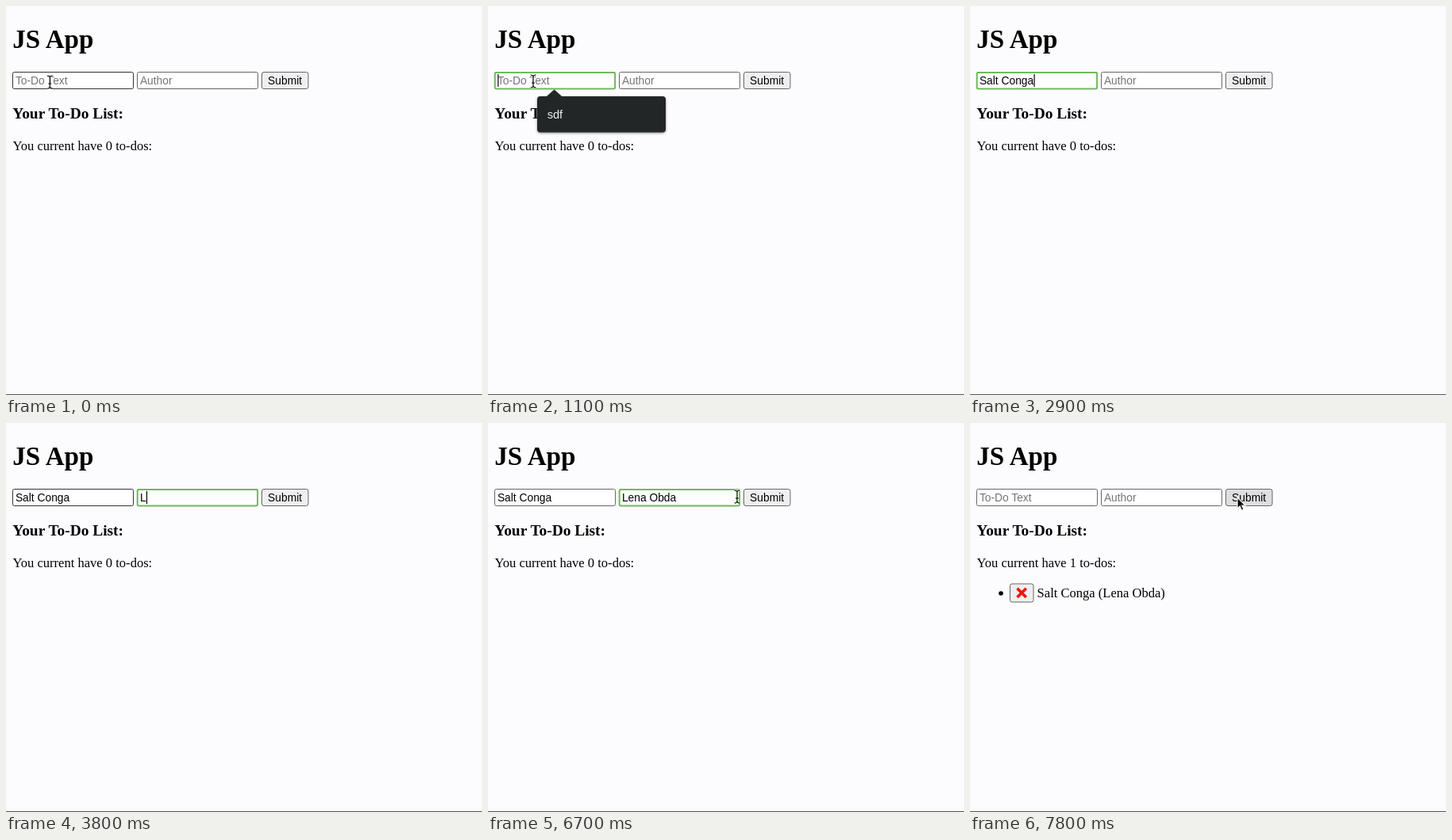
Animation, 600 px wide and 491 px high, one loop 8 s. Source, as an HTML page:

```html
<!DOCTYPE html>
<html lang="en">
<head>
<meta charset="utf-8">
<title>JS App</title>
<style>
  html, body { margin: 0; width: 100%; height: 100%; overflow: hidden; background: #fcfbfe; }
  svg { display: block; }
  text { white-space: pre; fill: #000; }
  .serif { font: 16.56px "Liberation Serif", serif; }
  .h1 { font-size: 33.1px; font-weight: bold; }
  .h3 { font-size: 19.4px; font-weight: bold; }
  .sans { font: 13.8px "Liberation Sans", sans-serif; }
  .box { fill: #fff; stroke: #666; }
  .btn { fill: #efefef; stroke: #666; }
  .ring { fill: none; stroke: #6fba5c; stroke-width: 2; }
  .halo { fill: none; stroke: #fff; stroke-width: 3; opacity: .85; }
  .ink { fill: none; stroke: #000; stroke-width: 1.2; }
</style>
</head>
<body>
<svg width="600" height="491" viewBox="0 0 600 491">
  <defs>
    <filter id="shadow" x="-10%" y="-20%" width="120%" height="150%">
      <feDropShadow dx="0" dy="1" stdDeviation="1.5" flood-opacity=".45"/>
    </filter>
    <path id="beamPath" d="M-3.5-8Q0-8 0-5.5Q0-8 3.5-8M0-6V6M-3.5 8Q0 8 0 5.5Q0 8 3.5 8M-2 2H2"/>
  </defs>
  <rect width="600" height="491" fill="#fcfbfe"/>
  <rect y="490" width="600" height="1" fill="#555"/>

  <text class="serif h1" x="8.3" y="52.7">JS App</text>
  <text class="serif h3" x="8.3" y="142.3">Your To-Do List:</text>
  <text class="serif" id="count" x="8.5" y="182"></text>

  <g id="fields"></g>
  <rect class="btn" id="submit" x="322.5" y="83.5" width="58.5" height="21" rx="2.5"/>
  <text class="sans" x="351.6" y="98.7" text-anchor="middle">Submit</text>
  <rect id="caret" y="86" width="1.2" height="16"/>

  <g id="item">
    <circle cx="39" cy="215" r="2.8"/>
    <rect class="btn" x="50.5" y="203" width="29.5" height="23" rx="2.5"/>
    <path d="M59.5 208.7L70.8 220M70.8 208.7L59.5 220" stroke="#f01408" stroke-width="3.6" fill="none"/>
    <text class="serif" id="label" x="84.6" y="220"></text>
  </g>

  <g id="popup">
    <path filter="url(#shadow)" fill="#222628"
      d="M66 114H74L83.5 105.5L93 114H220a4 4 0 0 1 4 4V155.5a4 4 0 0 1-4 4H66a4 4 0 0 1-4-4V118a4 4 0 0 1 4-4Z"/>
    <text class="sans" x="74.7" y="142" style="font-size:14.6px;fill:#f1f1f1">sdf</text>
  </g>

  <g id="beam"><use href="#beamPath" class="halo"/><use href="#beamPath" class="ink"/></g>
  <path id="arrow" d="M0 0V14L3.2 11L5.4 16.2L7.9 15.1L5.7 10.1H10Z" stroke="#fff" stroke-width="1.2"/>
</svg>
<script>
const LOOP = 8000, STEP = 100;
const FOCUS = [100, 3200], PRESS = 7200, ADDED = 7300;
const $ = id => document.getElementById(id);

function makeField(x, hint, value, keys) {
  const g = document.createElementNS("http://www.w3.org/2000/svg", "g");
  g.innerHTML = `<rect class="box" x="${x + 0.5}" y="83.5" width="152" height="21" rx="2"/>
    <text class="sans" x="${x + 3.9}" y="98.7"></text>
    <rect class="ring" x="${x + 0.7}" y="84" width="151.4" height="20.4" rx="2"/>`;
  $("fields").append(g);
  const [box, text, ring] = g.children;
  return { x, hint, value, keys, box, text, ring };
}

const fields = [
  makeField(8, "To-Do Text", "Salt Conga",
    [1500, 1700, 1800, 2000, 2100, 2300, 2500, 2600, 2700, 2900]),
  makeField(165, "Author", "Lena Obda",
    [3800, 4000, 4200, 4300, 4500, 4700, 4900, 5000, 5200])
];
$("label").textContent = `${fields[0].value} (${fields[1].value})`;

// Pointer path: time, x, y
const path = [
  [0, 55.3, 96], [100, 55.3, 96], [500, 57, 95.3], [1000, 56.6, 95.3], [1100, 57, 95],
  [6000, 57, 95], [6100, 72, 96], [6300, 160, 100], [6500, 270, 95], [6700, 314, 93],
  [6800, 316, 93], [6900, 325, 93], [7100, 336, 94], [7300, 338, 95], [7600, 337.6, 94.6],
  [7800, 337, 94], [LOOP, 337, 94]
];

function pointerAt(t) {
  const i = path.findIndex(p => p[0] > t);
  const [t0, x0, y0] = path[i - 1], [t1, x1, y1] = path[i];
  const k = (t - t0) / (t1 - t0);
  return [x0 + (x1 - x0) * k, y0 + (y1 - y0) * k];
}

const show = (el, on) => el.setAttribute("visibility", on ? "visible" : "hidden");

function drawField(f, t, focused) {
  const typed = t < ADDED ? f.keys.filter(k => k <= t).length : 0;
  f.text.textContent = typed ? f.value.slice(0, typed) : f.hint;
  f.text.style.fill = typed ? "#000" : "#757575";
  show(f.ring, focused);
  return typed;
}

function drawCaret(f, t, typed, since) {
  const last = typed ? f.keys[typed - 1] : since;
  const width = typed ? f.text.getComputedTextLength() : 0;
  $("caret").setAttribute("x", f.x + 4.2 + width);
  show($("caret"), Math.floor((t - last) / 500) % 2 === 0);
}

function drawPointer(t) {
  const [x, y] = pointerAt(t);
  const visible = t < 1500 || t >= 6000;
  const overField = fields.some(f => x > f.x && x < f.x + 153);
  for (const id of ["beam", "arrow"]) {
    $(id).setAttribute("transform", `translate(${x} ${y})`);
    show($(id), visible && overField === (id === "beam"));
  }
  return x > 322;
}

function draw(time) {
  const t = Math.floor((time % LOOP) / STEP) * STEP;
  const active = t < FOCUS[0] || t >= PRESS ? -1 : t < FOCUS[1] ? 0 : 1;
  show($("caret"), false);
  fields.forEach((f, i) => {
    const typed = drawField(f, t, i === active);
    if (i === active) drawCaret(f, t, typed, FOCUS[i]);
  });
  const dark = t < FOCUS[0] || (t >= FOCUS[1] && t < 6000);
  fields[0].box.style.stroke = dark ? "#333" : "#666";

  const added = t >= ADDED;
  $("count").textContent = `You current have ${added ? 1 : 0} to-dos:`;
  show($("item"), added);

  const fade = t < 1500 ? Math.min(1, Math.max(0, (t - 100) / 200)) : 0;
  $("popup").setAttribute("opacity", fade);

  const hover = drawPointer(t);
  const pressed = t >= PRESS && t < ADDED;
  $("submit").style.fill = pressed ? "#f5f5f5" : hover ? "#dedede" : "#efefef";
}

const start = performance.now();
function tick() {
  draw(performance.now() - start);
  requestAnimationFrame(tick);
}
tick();
</script>
</body>
</html>
```
